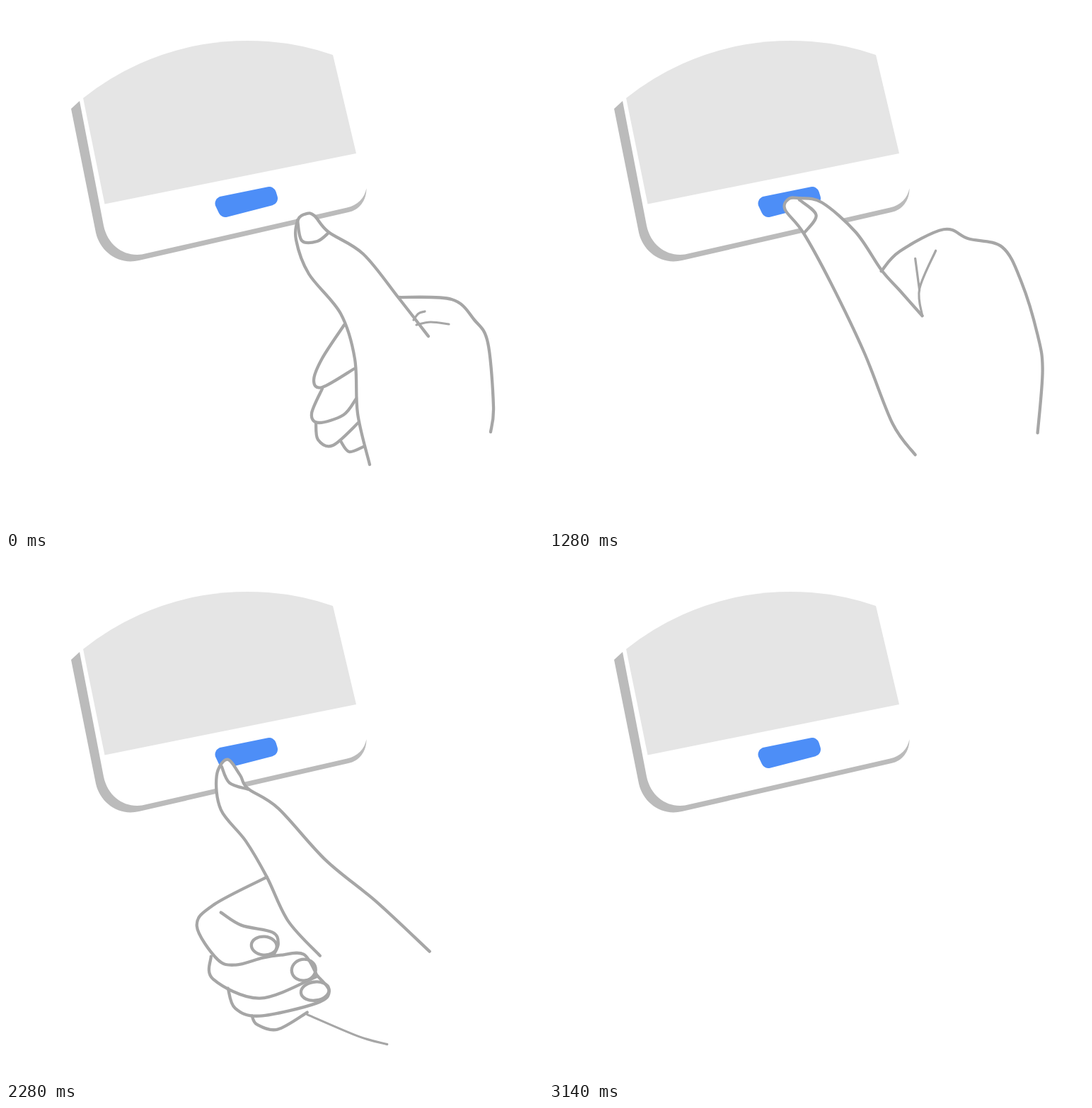
Animation of 759x738 px, one loop 3470 ms. Source, as an HTML page:

```html
<!DOCTYPE html>
<html lang="en">
<head>
<meta charset="utf-8">
<title>Thumb on button</title>
<style>
  html, body { margin: 0; width: 100%; height: 100%; overflow: hidden; background: #fff; }
  svg { display: block; width: 100%; height: 100%; }
  .hand { fill: none; stroke: #a6a6a6; stroke-width: 4.3; stroke-linecap: round; stroke-linejoin: round; }
  .solid { fill: #fff; }
  .thin { stroke-width: 3.2; }
</style>
</head>
<body>
<svg viewBox="0 0 759 738">
  <path fill="#bbb" d="M92 145L104 134L138 310C144 338 167 354 192 350.500L482 284.500C497 281 507 271 509.500 257C509.500 275 499 288 484 291L188 359C158 366 133 346 127 320Z"/>
  <path fill="#e5e5e5" d="M109 130A373 373 0 0 1 462 69L495 208L139.500 279.500Z"/>
  <path fill="#4d8ef7" stroke="#4d8ef7" stroke-width="20" stroke-linejoin="round" d="M305.500 278.500L372 265L374 271.500L310 288Z"/>
  <g class="hand" id="press">
    <path class="solid" id="thumb"/><path id="nail"/>
    <g id="palm"/><g id="creases" class="thin"/><g id="fingers"/>
  </g>
  <g class="hand" id="side"/>
  <g class="hand" id="fist"/>
</svg>
<script>
const LOOP = 3470, FRAME = 40;
const get = id => document.getElementById(id);
const lerp = (a, b, p) => a.map((v, i) => v + (b[i] - v) * p);

// Smooth curve through a few key points, given as x, y, x, y, ...
function curve(flat) {
  const points = [];
  for (let i = 0; i < flat.length; i += 2) points.push([flat[i], flat[i + 1]]);
  const at = i => points[Math.max(0, Math.min(points.length - 1, i))];
  const handle = (i, sign) => at(i).map((v, k) => v + sign * (at(i + 1)[k] - at(i - 1)[k]) / 6);
  return 'M' + points.map((point, i) => i ? `C${handle(i - 1, 1)} ${handle(i, -1)} ${point}` : point).join('');
}

const line = (points, className = '') => `<path class="${className}" d="${curve(points)}"/>`;
const oval = (x, y, rx, ry, turn) =>
  `<ellipse rx="${rx}" ry="${ry}" transform="translate(${x} ${y}) rotate(${turn})"/>`;

// First hand: the thumb bends between two outlines, the other parts follow a matrix
const thumb = {
  from: [514,647, 497,575, 493,498, 473,434, 428,378, 410,330, 413,301, 425,293, 436,296, 456,319, 505,350, 555,412, 597,466],
  to: [427,593, 396,535, 375,455, 357,391, 329,340, 314,268, 323,240, 340,230, 353,237, 364,262, 386,302, 411,352, 468,416]
};
const nail = {
  from: [412,302, 418,331, 440,332, 456,320],
  to: [325,241, 325,276, 350,282, 364,274]
};
const REST = [1, 0, 0, 1, 0, 0];
const followers = {
  palm: [1.026, .048, .083, 1.009, -193, -89],
  creases: [1, 0, 0, 1, -133, -56],
  fingers: [1.074, -.219, .105, .959, -206, 65]
};
get('palm').innerHTML = line([555,411, 630,414, 662,443, 681,475, 689,565, 685,601]);
get('creases').innerHTML = line([592,431, 583,434, 576,443]) + line([580,450, 600,446, 626,449]);
get('fingers').innerHTML =
  line([478,450, 447,497, 435,528, 447,538, 492,512]) +
  line([447,540, 432,575, 442,588, 477,577, 495,554]) +
  line([438,588, 441,612, 462,620, 499,587]) +
  line([473,614, 485,629, 505,622]);

get('side').innerHTML =
  line([517,634, 485,590, 445,490, 398,392, 359,321, 333,288, 338,273, 353,272, 385,278, 433,320, 469,373, 495,402, 527,438], 'solid') +
  line([353,274, 377,296, 360,321]) +
  line([469,375, 495,347, 557,316, 592,329, 640,341, 667,390, 690,465, 697,515, 690,603]) +
  line([546,346, 523,400, 527,438], 'thin') +
  line([517,357, 523,402], 'thin');

get('fist').innerHTML =
  line([465,512, 420,463, 390,401, 360,350, 325,306, 319,258, 334,235, 352,257, 363,276, 406,304, 473,377, 545,436, 620,506], 'solid') +
  line([326,245, 337,268, 363,277]) +
  line([390,401, 315,440, 291,470, 320,517, 346,525, 384,515, 410,511, 442,510, 461,540]) +
  line([325,451, 354,469, 398,479, 406,495, 400,510]) +
  line([311,513, 314,545, 380,572, 461,541]) +
  line([335,558, 345,586, 380,597, 460,579, 478,562, 462,541]) +
  line([369,597, 376,609, 405,616, 447,592]) +
  line([447,595, 520,626, 560,637], 'thin') +
  oval(386, 498, 18, 13, 5) + oval(442, 532, 17, 15, -10) + oval(458, 562, 20, 13, -8);

function show(id, opacity, x = 0, y = 0) {
  get(id).setAttribute('opacity', opacity);
  get(id).setAttribute('transform', `translate(${x} ${y})`);
}

function draw(t) {
  // Goes from 0 to 1 in equal jumps, the first one at the start time
  const steps = (start, count) =>
    Math.max(0, Math.min(count, Math.floor((t - start) / FRAME) + 1)) / count;

  const bend = steps(40, 8);
  get('thumb').setAttribute('d', curve(lerp(thumb.from, thumb.to, bend)));
  get('nail').setAttribute('d', curve(lerp(nail.from, nail.to, bend)));
  for (const id in followers)
    get(id).setAttribute('transform', `matrix(${lerp(REST, followers[id], bend)})`);
  show('press', 1 - steps(680, 4));

  const slide = steps(1120, 8) - steps(1600, 5);
  show('side', steps(1000, 3) - steps(1800, 4), 50 - 79 * slide, 43 - 70 * slide);

  const away = 1 - steps(2200, 8) + steps(2730, 4);
  show('fist', steps(2080, 3) - steps(3100, 2), -34 * away, 81 * away);
}

const begin = performance.now();
function tick() {
  draw((performance.now() - begin) % LOOP);
  requestAnimationFrame(tick);
}
tick();
</script>
</body>
</html>
```
